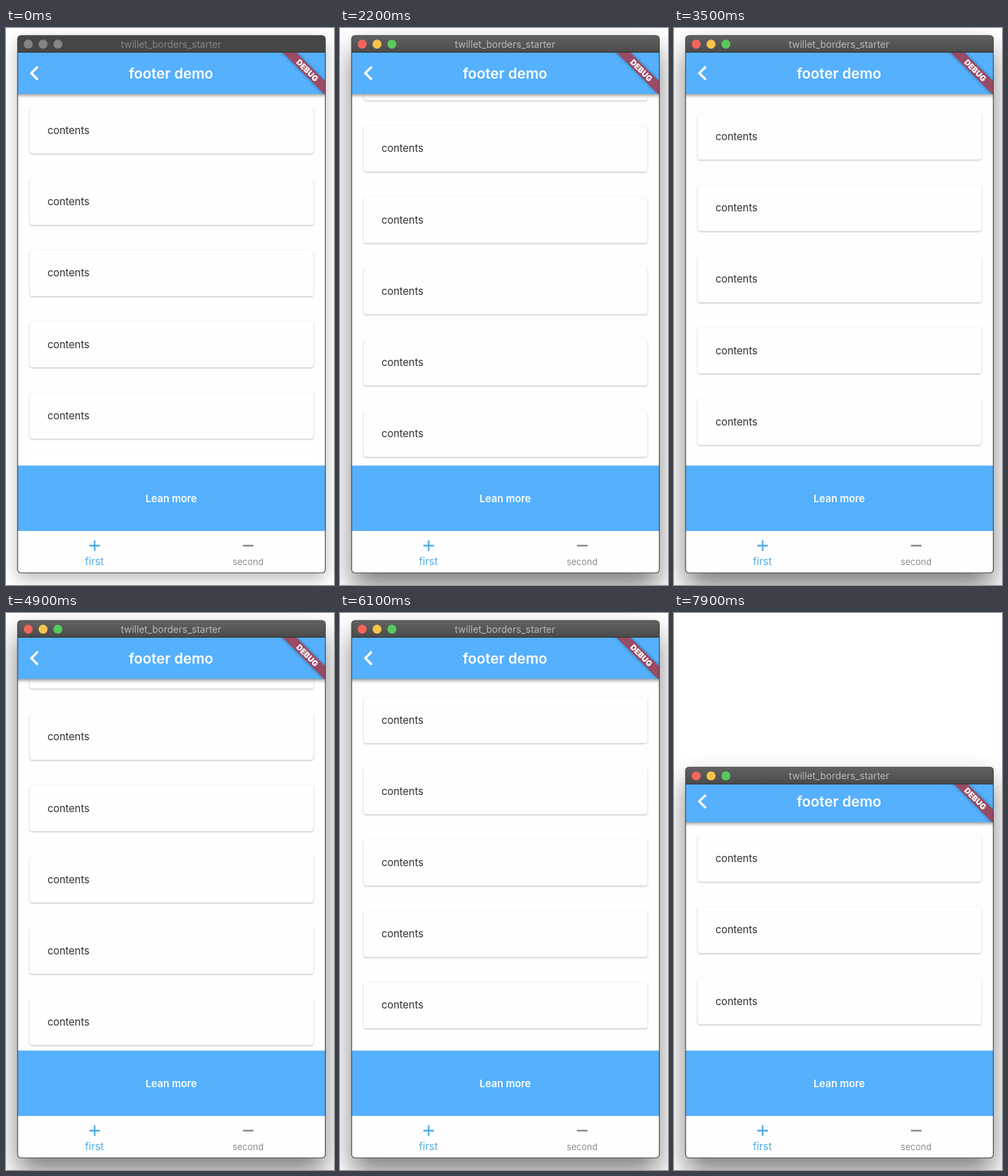
Recreate the animation shown at these times as an HTML page. Size 480x814 px, loop 8000 ms.

```html
<!DOCTYPE html>
<html lang="en">
<head>
<meta charset="utf-8">
<title>Footer demo</title>
<style>
  html, body { margin: 0; width: 100%; height: 100%; overflow: hidden; background: #fff; }
  svg { display: block; width: 480px; height: 814px; font-family: Inter, "Open Sans", sans-serif; }
  #cards { filter: drop-shadow(0 1px 1px rgba(0, 0, 0, .27)); }
  .soft { filter: blur(2.5px); }
  .mid { text-anchor: middle; }
</style>
</head>
<body>
<svg viewBox="0 0 480 814">
  <defs>
    <clipPath id="windowClip"><rect id="windowShape" x="17" width="450" rx="5"/></clipPath>
    <clipPath id="barClip"><rect x="17" y="30" width="450" height="66.5"/></clipPath>
    <linearGradient id="titleFill" x2="0" y2="1">
      <stop offset="0" stop-color="#626262"/>
      <stop offset="1" stop-color="#4a4a4a"/>
    </linearGradient>
  </defs>

  <rect id="shadow" x="17" width="450" rx="6"/>

  <g clip-path="url(#windowClip)">
    <rect x="17" width="450" height="814" fill="#fefefe"/>
    <g id="list">
      <g id="cards" fill="#fefefe"></g>
      <g id="labels" font-size="15" fill="#303030"></g>
    </g>

    <g id="appBar">
      <rect class="soft" x="12" y="40" width="460" height="58.5" opacity=".42"/>
      <g clip-path="url(#barClip)">
        <rect x="17" y="30" width="450" height="66.5" fill="#55b0fd"/>
        <path d="M46.5 56.5 37 66l9.5 9.5" fill="none" stroke="#fff" stroke-width="3.3"/>
        <text class="mid" x="241.5" y="73.7" font-size="21" font-weight="600" fill="#fff">footer demo</text>
        <g transform="translate(441 62) rotate(45)">
          <rect class="soft" x="-60" y="-7" width="120" height="14" opacity=".4"/>
          <rect x="-60" y="-7" width="120" height="14" fill="#9b4a63"/>
          <text class="mid" y="4.1" font-size="11.5" font-weight="900" fill="#fff">DEBUG</text>
        </g>
      </g>
    </g>

    <rect x="17" y="639.5" width="450" height="95.5" fill="#55b0fd"/>
    <text class="mid" x="241.8" y="693.3" font-size="14.8" font-weight="600" fill="#fff">Lean more</text>
    <rect x="17" y="735" width="450" height="62" fill="#fefefe"/>
    <path d="M122 756.5h15.5M129.7 748.7v15.5" stroke="#52abe4" stroke-width="2.3"/>
    <path d="M346.7 756.5h15.6" stroke="#7d7d7d" stroke-width="2.2"/>
    <text class="mid" x="129.3" y="784.8" font-size="15" fill="#52abe4">first</text>
    <text class="mid" x="354.3" y="784.5" font-size="13" fill="#8c8c8c">second</text>

    <g id="titleBar">
      <rect id="titleBack" x="17" y="11" width="450" height="25"/>
      <path d="M17 35.5h450" stroke="#303030"/>
      <g id="lights"></g>
      <text id="title" class="mid" x="241.5" y="29" font-size="14">twillet_borders_starter</text>
    </g>
  </g>
  <rect id="border" x="17" width="450.3" rx="5" fill="none" stroke="#3c3c3c" stroke-width="1.1"/>
</svg>

<script>
const LOOP = 8000, PITCH = 104.2, TOP = 11, BOTTOM = 796.3;
const LIGHTS = ["#f2655c", "#f8c34d", "#58c95e"];
const $ = id => document.getElementById(id);

// [time, value] keys
const SCROLL = [[100, 0], [700, 250], [1500, 420], [2200, 182.2], [2900, 15],
  [3500, -9], [4400, 0], [4500, 0], [4900, 72.7], [5450, 170], [6100, -6.5], [6700, 0]];
const RESIZE = [[6900, 0], [7050, 16], [7200, 59], [7300, 76], [7400, 83.7],
  [7500, 96], [7900, 214], [8000, 242]];

function add(parent, tag, attrs, text = "") {
  const el = document.createElementNS("http://www.w3.org/2000/svg", tag);
  set(el, attrs);
  el.textContent = text;
  parent.append(el);
  return el;
}

function set(el, attrs) {
  for (const name in attrs) el.setAttribute(name, attrs[name]);
}

// Smooth cubic curve through the keys, flat at both ends
function curve(keys, t) {
  const last = keys.length - 1;
  if (t <= keys[0][0]) return keys[0][1];
  if (t >= keys[last][0]) return keys[last][1];
  const i = keys.findIndex(key => key[0] > t) - 1;
  const slope = k => k <= 0 || k >= last ? 0 :
    (keys[k + 1][1] - keys[k - 1][1]) / (keys[k + 1][0] - keys[k - 1][0]);
  const [t0, v0] = keys[i], [t1, v1] = keys[i + 1];
  const span = t1 - t0, u = (t - t0) / span, w = 1 - u;
  return w * w * ((1 + 2 * u) * v0 + u * span * slope(i)) +
    u * u * ((1 + 2 * w) * v1 - w * span * slope(i + 1));
}

for (let row = 0; row < 7; row++) {
  const y = 116 + row * PITCH;
  add($("cards"), "rect", { x: 34.7, y, width: 415.2, height: 67.5, rx: 4 });
  add($("labels"), "text", { x: 60.7, y: y + 39 }, "contents");
}
const lights = LIGHTS.map((_, i) =>
  add($("lights"), "circle", { cx: 32.5 + i * 21.7, cy: 23.7, r: 6.6 }));

function draw(t) {
  const active = t >= 100;
  const shift = curve(RESIZE, t);
  // The app's contents trail the window frame slightly
  const barShift = curve(RESIZE, t - 17);
  const scroll = curve(SCROLL, t);
  const offset = ((scroll % PITCH) + PITCH) % PITCH;
  const box = { y: TOP + shift, height: BOTTOM - TOP - shift };

  set($("windowShape"), box);
  set($("border"), box);
  set($("shadow"), {
    y: box.y + (active ? 21 : 9),
    height: box.height,
    opacity: active ? .5 : .27,
    style: `filter: blur(${active ? 19 : 12}px)`
  });
  set($("titleBar"), { transform: `translate(0 ${shift})` });
  set($("appBar"), { transform: `translate(0 ${barShift})` });
  set($("list"), { transform: `translate(0 ${barShift - offset})` });

  set($("titleBack"), { fill: active ? "url(#titleFill)" : "#464646" });
  set($("title"), { fill: active ? "#b8b8b8" : "#858585" });
  lights.forEach((light, i) => set(light, { fill: active ? LIGHTS[i] : "#858585" }));
}

const start = performance.now();
function tick() {
  draw((performance.now() - start) % LOOP);
  requestAnimationFrame(tick);
}
tick();
</script>
</body>
</html>
```
